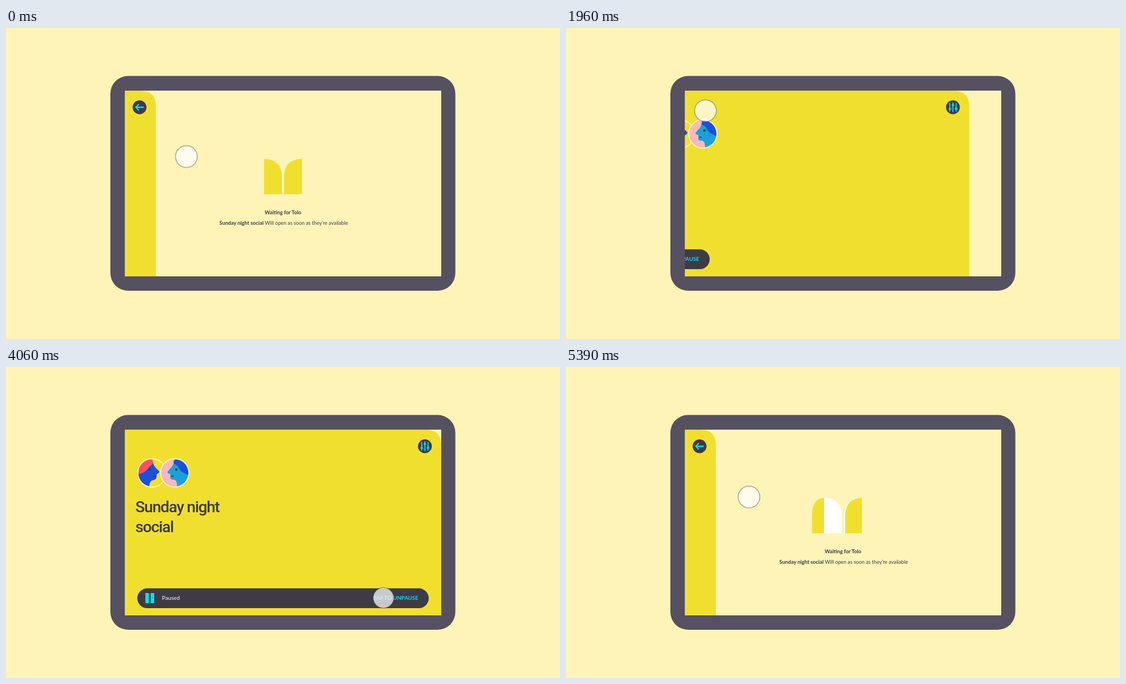
An HTML page for the animation above (5.46 s loop, 998 by 561 pixels).

```html
<!DOCTYPE html>
<html lang="en">
<head>
<meta charset="utf-8">
<title>Waiting room</title>
<style>
  html, body { margin: 0; width: 100%; height: 100%; overflow: hidden; background: #fef4b8; }
  svg { display: block; width: 100%; height: 100%; }
  text { font-family: Lato, sans-serif; fill: #3e3a46; }
  .bold { font-weight: 700; }
  .title { font: 500 28.5px Roboto, sans-serif; letter-spacing: -1.2px; }
  .dark { fill: #3e3a46; }
  .yellow { fill: #f1df30; }
  .line { fill: none; stroke: #00e1ec; stroke-linecap: round; stroke-linejoin: round; }
  .rim { fill: none; stroke: #fef4c4; stroke-width: 1.8; }
</style>
</head>
<body>
<svg viewBox="0 0 998 561">
  <defs>
    <clipPath id="screen"><path d="M214 113H784V448H214Z"/></clipPath>
    <clipPath id="face"><circle r="25.5"/></clipPath>
    <path id="door" d="M0 0Q32 1 32 32V64H0Z"/>
  </defs>

  <rect x="188" y="86.5" width="621.5" height="387.5" rx="32" fill="#565160"/>
  <path d="M214 113H784V448H214Z" fill="#fef4b8"/>

  <g clip-path="url(#screen)">
    <g transform="translate(465 236)">
      <use id="leftGap" href="#door" fill="#fff"/>
      <use id="left" href="#door" class="yellow"/>
    </g>
    <g transform="translate(533 236) scale(-1 1)">
      <use id="rightGap" href="#door" fill="#fff"/>
      <use id="right" href="#door" class="yellow"/>
    </g>
    <text class="bold" x="499" y="335.6" font-size="9.3" text-anchor="middle">Waiting for Tolo</text>
    <text class="bold" x="464" y="354.6" font-size="9.4" text-anchor="end">Sunday night social</text>
    <text x="466.3" y="354.6" font-size="9.2">Will open as soon as they’re available</text>

    <g id="panel">
      <path class="yellow" d="M-400 113H757Q784 114 784 141V448H-400Z"/>
      <g transform="translate(263 191)">
        <g clip-path="url(#face)">
          <path fill="#1b50df" d="M1-20Q4-11 9-7L13-3Q14 0 9 2L8 6Q9 12 2 13Q-5 14-5 26H-26V0Z"/>
          <path fill="#fc5163" d="M-26 3Q-10-1-5-11Q0-14 2-18Q2-25-3-26H-26Z"/>
          <circle cx="-4" cy="-6" r="2.3" class="dark"/>
          <path d="M1 6H6" stroke="#3e3a46" stroke-width="1.6"/>
        </g>
        <circle r="25.5" class="rim"/>
      </g>
      <g transform="translate(304 191)">
        <g clip-path="url(#face)">
          <circle r="26" fill="#f8b9c1"/>
          <path fill="#18a2d9" d="M-1-20Q-4-11-9-7L-13-2Q-14 1-8 2L-8 7Q-9 13-2 12Q5 13 4 26H26V-20Z"/>
          <path fill="#1b50df" d="M-2-16Q-3-24 3-26H26V4Q11 0 7-9Q5-15-2-16Z"/>
          <circle cx="3" cy="-6" r="2.3" class="dark"/>
          <path d="M-7 6H-2" stroke="#3e3a46" stroke-width="1.6"/>
        </g>
        <circle r="25.5" class="rim"/>
      </g>
      <g transform="translate(754.6 143)">
        <circle r="12.5" class="dark"/>
        <path id="arrow" class="line" stroke-width="2.3" d="M7 0H-7M-2-5L-7 0L-2 5"/>
        <g id="sliders">
          <path class="line" stroke-width="1.9" d="M-5.7-7V7M0-8V8M5.7-7V7"/>
          <g fill="#00e1ec">
            <circle cx="-5.7" cy="3" r="2.2"/>
            <circle cy="-4" r="2.2"/>
            <circle cx="5.7" cy="2.5" r="2.2"/>
          </g>
        </g>
      </g>
    </g>

    <g id="title">
      <text class="title" x="233" y="262">Sunday night</text>
      <text class="title" x="233" y="297.7">social</text>
    </g>

    <g id="bar">
      <rect class="dark" x="236.5" y="399.3" width="525" height="35.7" rx="17.8"/>
      <path class="yellow" d="M251 408H257.2V426H251ZM260.8 408H267V426H260.8Z"/>
      <path id="fill" fill="#00e1ec"/>
      <text x="281" y="419.8" font-size="10.2" style="fill:#fff">Paused</text>
      <text class="bold" x="742.6" y="419.8" font-size="9.8" text-anchor="end" style="fill:#00e1ec">TAP TO UNPAUSE</text>
    </g>
  </g>

  <circle id="cursor" fill="#fff" fill-opacity=".72" stroke="#3e3a46" stroke-opacity=".4" stroke-width="1.7"/>
</svg>
<script>
const LOOP = 5460;
const $ = id => document.getElementById(id);
const set = (id, name, value) => $(id).setAttribute(name, value);
const clamp = (v, lo, hi) => Math.min(hi, Math.max(lo, v));
const ramp = (t, a, b) => clamp((t - a) / (b - a), 0, 1);
const ease = (t, a, b) => { const u = ramp(t, a, b); return u * u * (3 - 2 * u); };
const bump = (t, a, b) => Math.sin(Math.PI * ramp(t, a, b)) ** 2;
const shift = (id, x) => set(id, 'transform', `translate(${x} 0)`);

// Cursor legs: start, end, from, to
const rest = [325, 232], back = [241, 143], tap = [680, 416.5];
const legs = [[0, 1240, rest, back], [1772, 3852, back, tap], [4440, 5460, tap, rest]];

function moveCursor(t) {
  const [a, b, from, to] = legs.findLast(leg => t >= leg[0]);
  const k = ease(t, a, b);
  set('cursor', 'cx', from[0] + (to[0] - from[0]) * k);
  set('cursor', 'cy', from[1] + (to[1] - from[1]) * k);
  set('cursor', 'r', 19.6 - 1.6 * (bump(t, 1250, 1510) + bump(t, 3880, 4140)));
}

function swing(side, angle) {
  set(side, 'transform', `scale(${Math.cos(angle * Math.PI / 180)} 1)`);
  set(side + 'Gap', 'opacity', angle > 0 ? 1 : 0);
}

function draw(t) {
  const close = ease(t, 4200, 4810);
  const open = ease(t, 1478, 2088) - close;
  const enter = ease(t, 1840, 2450);
  shift('panel', -514 * (1 - open));
  shift('title', -514 * (1 - enter + close));
  shift('bar', -560 * (1 - enter + ease(t, 4208, 4818)));

  const mix = ramp(open, 0.58, 0.85);
  set('sliders', 'opacity', mix);
  set('arrow', 'opacity', 1 - mix);

  const top = 426 - 18 * ramp(t, 2480, 4130);
  set('fill', 'd', `M251 ${top}H257.2V426H251ZM260.8 ${top}H267V426H260.8Z`);

  const wait = t < 3000 ? t : t - 4725;
  swing('left', 133 * bump(wait, 0, 1300));
  swing('right', clamp(0.114 * (wait - 490), 0, 137));
  moveCursor(t);
}

function tick() {
  draw(performance.now() % LOOP);
  requestAnimationFrame(tick);
}
tick();
</script>
</body>
</html>
```
